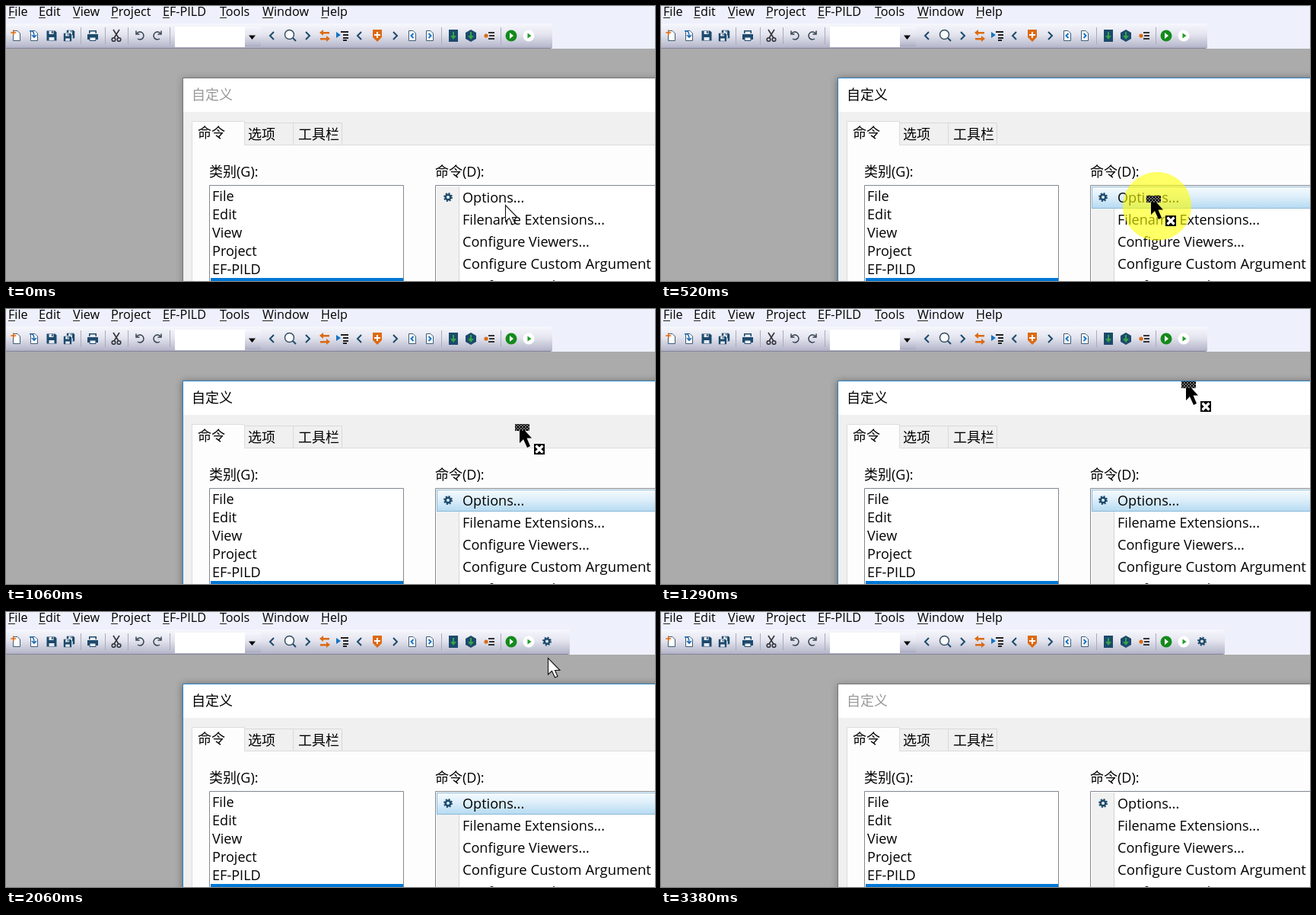
Recreate the animation shown at these times as an HTML page. Size 853x361 px, loop 3.61 s.

```html
<!DOCTYPE html>
<html lang="zh">
<head>
<meta charset="utf-8">
<title>Toolbar customisation</title>
<style>
html, body { margin: 0; width: 100%; height: 100%; overflow: hidden; background: #ababab; }
svg { display: block; width: 853px; height: 361px; }
text { font-family: "Open Sans", "Noto Sans CJK SC", "Noto Sans CJK", sans-serif; font-size: 18.1px; fill: #000; white-space: pre; }
.menu text { font-size: 16.2px; }
.line { fill: none; stroke: #1c4a6c; stroke-width: 2; }
.dark { fill: #1c4a6c; }
.orange { fill: #dc6a13; }
.page { fill: #fff; stroke: #3d5b74; stroke-width: 1; }
</style>
</head>
<body>
<svg viewBox="0 0 853 361">
  <defs>
    <linearGradient id="bar" x2="0" y2="1">
      <stop offset="0" stop-color="#f7f8fd"/><stop offset=".45" stop-color="#e3e4ee"/>
      <stop offset=".9" stop-color="#b9bacd"/><stop offset="1" stop-color="#a9aabd"/>
    </linearGradient>
    <linearGradient id="row" x2="0" y2="1">
      <stop offset="0" stop-color="#f5fafe"/><stop offset=".45" stop-color="#deeffa"/><stop offset="1" stop-color="#b5daf2"/>
    </linearGradient>
    <pattern id="check" width="4" height="4" patternUnits="userSpaceOnUse">
      <path d="M0 0h4v4h-4z"/><path fill="#fff" d="M.2.2h1.400v1.400H.2zM2.200 2.200h1.400v1.400h-1.400z"/>
    </pattern>
    <g id="gear" fill="none" stroke="#1c4a6c">
      <circle r="3.300" stroke-width="2.500"/>
      <circle r="5" stroke-width="1.900" stroke-dasharray="2 1.927"/>
    </g>
    <path id="left" class="line" d="M3-5L-2 0 3 5"/>
    <path id="right" class="line" d="M-3-5L2 0-3 5"/>
    <path id="sheet" class="page" d="M-4.500-6.500h5.500l3.500 3.500V6.500h-9z"/>
    <g id="disk"><path class="dark" d="M-6.500-6.500h11l2 2v11h-13z"/><path fill="#e8eaf2" d="M-3.500-6h6v4h-6zM-3.500 2h7v4h-7z"/><path class="dark" d="M0-6h1.500v3H0z"/></g>
    <g id="undo" fill="none" stroke="#30404d" stroke-width="1.500"><path d="M-4-3A5 5 0 1 1-3 4"/><path d="M-5-6.500v4.500h4.500"/></g>
    <path id="down" fill="#35a448" d="M-1-5h2v5h3L0 5-4 0h3z"/>
  </defs>

  <rect width="853" height="56" fill="#eef1fc"/>
  <g class="menu" id="menu"></g>
  <path id="strip" fill="url(#bar)"/>
  <path id="edge" stroke="#85859b"/>
  <g id="seps" stroke="#a9abbd"></g>
  <g id="icons">
    <g transform="translate(13 39)"><use href="#sheet" x="1"/><path class="orange" d="M-4-7.500h1.600v2.700h2.700v1.600h-2.700v2.700H-4v-2.700h-2.700v-1.600H-4z"/></g>
    <g transform="translate(36 39)"><use href="#sheet" x="1"/><path fill="none" stroke="#1769b5" stroke-width="1.600" d="M-5-6C0-7 1-4 1 1M-2-1L1 2 4-1"/></g>
    <use href="#disk" x="60" y="39"/>
    <g transform="translate(83 39)"><use href="#disk" transform="translate(2 -2) scale(.8)"/><path fill="#e8eaf2" d="M-7-4H4V7H-7z"/><use href="#disk" transform="translate(-2 2) scale(.8)"/></g>
    <g transform="translate(114 39)"><path class="dark" d="M-7-2H7V5H-7zM-5-7H5v4H-5z"/><path fill="#edf0f7" d="M-3.500-5.500h7v2.500h-7z"/><path fill="#edf0f7" stroke="#1c4a6c" d="M-4 2h8v4.500h-8z"/></g>
    <g transform="translate(145 39)" fill="none" stroke="#30353b" stroke-width="1.600"><path d="M-4-8L3 3M4-8L-3 3"/><circle cx="-3.500" cy="5" r="2.300"/><circle cx="3.500" cy="5" r="2.300"/></g>
    <use href="#undo" transform="translate(176 39)"/>
    <use href="#undo" transform="translate(199 39) scale(-1 1)"/>
    <path fill="#fff" d="M222 27h92v27h-92z"/>
    <path fill="url(#bar)" d="M314 27h21v26h-21z"/><path d="M319 38.500h9l-4.500 5.500z"/>
    <use href="#left" x="349" y="39"/>
    <g transform="translate(373 38)"><circle cx="-.5" cy="-.5" r="6" fill="#f8fafc" stroke="#354d60" stroke-width="1.500"/><path class="line" d="M4 4l4 4"/></g>
    <use href="#right" x="397" y="39"/>
    <g class="orange" transform="translate(419 39)"><path d="M-7-4l5-4v3h8v2.500h-8V0z"/><path d="M7 4l-5-4v3h-8v2.500h8V8z"/></g>
    <g transform="translate(442 39)"><path fill="#1473c4" d="M-8-5l6 4-6 4z"/><path stroke="#222" stroke-width="2" d="M-2-5H8M1-1h7M1 3h7M1 6h5"/></g>
    <use href="#left" x="464" y="39"/>
    <g transform="translate(488 39)"><path class="orange" d="M-6-8H6V2L0 8-6 2z"/><path fill="#fff" d="M-1-5h2v3h3v2h-3v3h-2V0h-3v-2h3z"/></g>
    <use href="#right" x="512" y="39"/>
    <g transform="translate(534 39)"><use href="#sheet"/><path fill="none" stroke="#1473c4" stroke-width="2" d="M1.500-3l-3 3 3 3"/></g>
    <g transform="translate(557 39)"><use href="#sheet"/><path fill="none" stroke="#1473c4" stroke-width="2" d="M-1.500-3l3 3-3 3"/></g>
    <g transform="translate(588 39)"><path class="dark" d="M-6-8H6V8H-6z"/><use href="#down"/></g>
    <g transform="translate(611 39)"><path class="dark" d="M0-8l7 4v8L0 8l-7-4v-8z"/><use href="#down"/></g>
    <g transform="translate(635 39)"><circle class="orange" cx="-4" r="2.600"/><path stroke="#333" stroke-width="1.800" d="M-1-4h8M0 0h7M-1 4h8"/></g>
    <circle cx="664" cy="39" r="7.500" fill="#148a1c"/><path fill="#fff" d="M662 35l5 4-5 4z"/>
    <circle cx="687" cy="39" r="7.500" fill="#fff"/><path fill="#249b2b" d="M685.500 35.500l5 3.500-5 3.500z"/>
  </g>
  <use id="added" href="#gear" x="711" y="38.500"/>

  <rect id="frame" x="232.500" y="94.500" width="640" height="300" fill="#f0f0f0"/>
  <path fill="#fff" d="M233 95h620v44H233z"/>
  <path fill="#f0f0f0" stroke="#d9d9d9" d="M313.500 182.500v-29h64v29M377.500 182.500v-29h64v29"/>
  <path fill="#fdfdfd" stroke="#dcdcdc" d="M244.500 371V151.500h69v31H870V371z"/>
  <path fill="#fff" stroke="#828790" d="M267.500 235.500h255V370h-255zM564.500 235.500H870V370H564.500z"/>
  <path fill="#0078d7" d="M269 357h253v4H269z"/>
  <path fill="#f1f1f1" d="M566 237h29v124h-29z"/><path fill="#d5d5d5" d="M595 237h1v124h-1z"/>
  <rect id="hot" x="566.500" y="237.500" width="300" height="28" fill="url(#row)" stroke="#8fb9d6"/>
  <use href="#gear" x="581" y="251"/><use href="#gear" x="581" y="367"/>
  <g id="labels"></g>

  <circle id="halo" cx="652" cy="263" r="45" fill="#ff0" fill-opacity=".6"/>
  <path id="caret" fill="none" stroke="#000" stroke-width="2" d="M697 27h6M700 27v15M697 42h6"/>
  <path id="arrow" fill="#fff" stroke="#111" stroke-width="1.100" d="M.5.5V22L5.500 17.500 9.500 26 13 24.500 9.500 16.500H16z"/>
  <g id="drag">
    <path d="M-1 0V24L4 19 9 30 13 28 8.500 17.500H15z"/>
    <rect x="-7" y="-1" width="19" height="9" fill="url(#check)"/>
    <g id="deny"><path d="M18 25h14v14H18z"/><path stroke="#fff" stroke-width="3.200" d="M20.500 27.500l9 9M29.500 27.500l-9 9"/></g>
  </g>
</svg>
<script>
const LOOP = 3610;
const PRESS = 460, DRAG = 520, RELEASE = 750, DROP = 1980, GONE = 2440, BLUR = 3380;
const $ = id => document.getElementById(id);

function add(parent, tag, attrs, content = "") {
  const el = document.createElementNS("http://www.w3.org/2000/svg", tag);
  for (const k in attrs) el.setAttribute(k, attrs[k]);
  el.textContent = content;
  parent.append(el);
  return el;
}
const label = (x, y, s, size = 18.1) =>
  add($("labels"), "text", { x, y, style: `font-size:${size}px` }, s);

const menuX = [3, 43, 88, 138, 206, 281, 337, 414];
["File", "Edit", "View", "Project", "EF-PILD", "Tools", "Window", "Help"].forEach((s, i) => {
  const x = menuX[i];
  add($("menu"), "text", { x, y: 13 }, s);
  add($("menu"), "rect", { x, y: 15, width: s[0] === "W" ? 14 : 9, height: 1, fill: "#222" });
});
[98, 130, 160, 215, 572, 650].forEach(x =>
  add($("seps"), "path", { d: `M${x + .5} 28v22` }));

const title = label(244, 123, "自定义", 18);
label(252, 173, "命令", 18);
label(318, 175, "选项", 18);
label(384, 175, "工具栏", 18);
label(267, 224, "类别(G):", 18);
label(564, 224, "命令(D):", 18);
["File", "Edit", "View", "Project", "EF-PILD"].forEach((s, i) => label(271, 256 + 24 * i, s));
["Options...", "Filename Extensions...", "Configure Viewers...", "Configure Custom Argument", "Configure Tools..."]
  .forEach((s, i) => label(600, 258 + 29 * i, s, i === 3 ? 18.6 : 18.1));

// Pointer positions: time, x, y; each holds until the next.
const path = [
  [0, 656, 261], [70, 648, 258], [210, 647, 255], [290, 646, 252], [370, 645, 250],
  [980, 664, 202], [1060, 676, 152], [1140, 684, 120], [1220, 691, 96], [1300, 696, 76],
  [1380, 699, 61], [1450, 702, 51], [1520, 703, 47], [1600, 704, 43],
  [2060, 712, 60], [2140, 729, 92], [2210, 750, 132], [2290, 774, 173], [2370, 792, 204]
];
const show = (id, on) => $(id).setAttribute("visibility", on ? "visible" : "hidden");

function draw(t) {
  const active = t >= PRESS && t < BLUR;
  const dropped = t >= DROP;
  const dragging = t >= DRAG && !dropped;
  const [, x, y] = path.findLast(p => p[0] <= t);
  const end = dropped ? 741 : 718;

  $("strip").setAttribute("d", `M0 23H${end - 2}q2 0 2 2V54q0 2-2 2H0z`);
  $("edge").setAttribute("d", `M0 55.500H${end - 2}`);
  show("added", dropped);
  $("frame").setAttribute("stroke", active ? "#2c83c3" : "#777");
  $("frame").style.filter = `drop-shadow(0 1px 5px rgba(0,0,0,${active ? .45 : .25}))`;
  title.style.fill = active ? "#000" : "#999";
  show("hot", active);
  show("halo", t >= PRESS && t < RELEASE);
  show("caret", t >= 1450 && !dropped);
  show("arrow", !dragging && t < GONE);
  show("drag", dragging);
  show("deny", dragging && y > 55);
  for (const id of ["arrow", "drag"]) $(id).setAttribute("transform", `translate(${x} ${y})`);
}

function tick() {
  draw(performance.now() % LOOP);
  requestAnimationFrame(tick);
}
tick();
</script>
</body>
</html>
```
